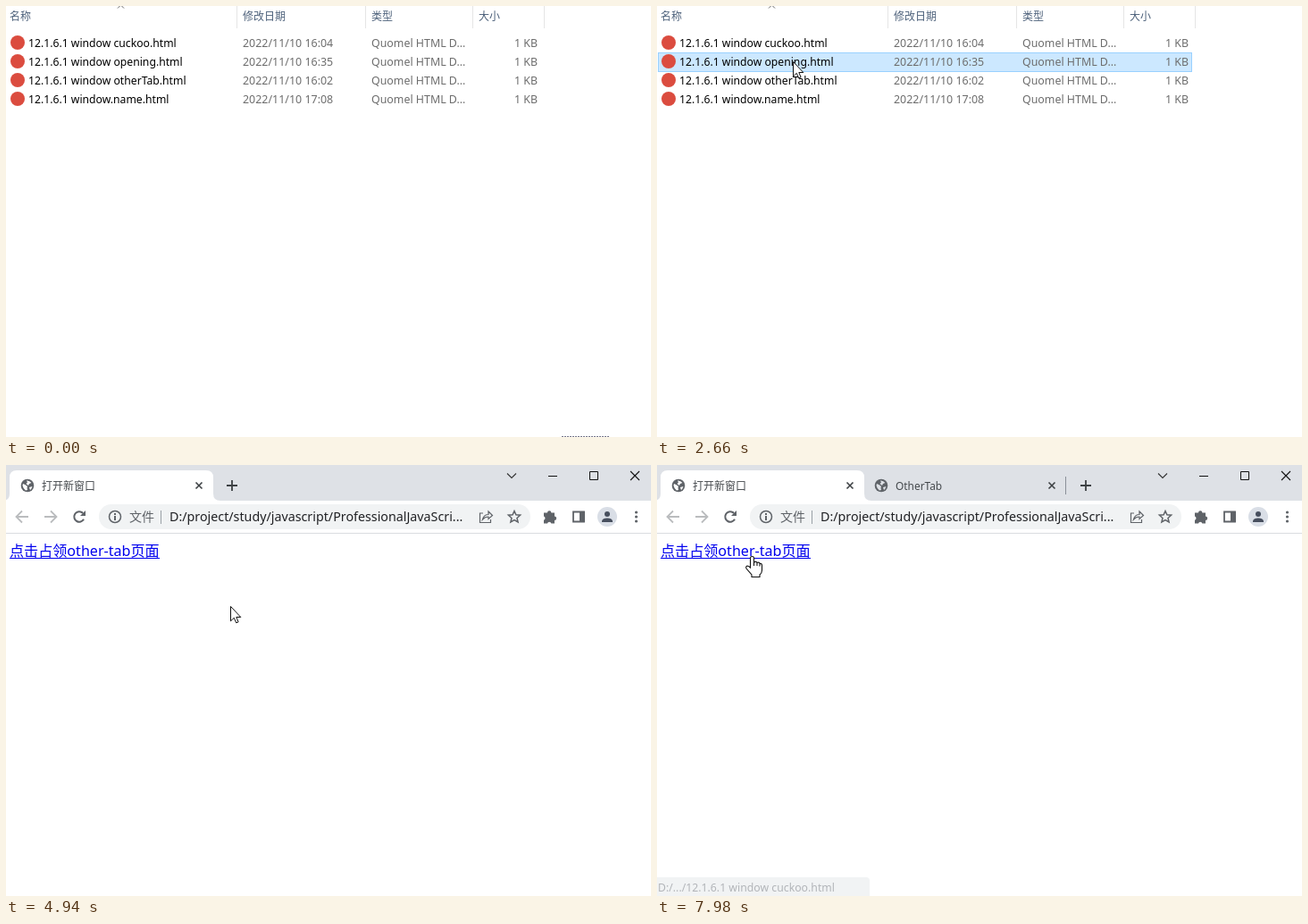
An HTML page with a canvas for the animation above (8000 ms loop, 722 px wide and 483 px high).

```html
<!DOCTYPE html>
<html lang="zh">
<head>
<meta charset="utf-8">
<title>window.name</title>
<style>
html, body { margin: 0; width: 100%; height: 100%; overflow: hidden; background: #fff; }
canvas { display: block; }
</style>
</head>
<body>
<canvas id="stage" width="722" height="483"></canvas>
<script>
const W = 722, H = 483, LOOP = 8000;
const c = document.getElementById('stage').getContext('2d');
const FONT = '"Noto Sans", "Noto Sans CJK SC", "Noto Sans CJK", sans-serif';
const GREY = '#5f6368';

const files = [
  [' cuckoo', '16:04'], [' opening', '16:35'], [' otherTab', '16:02'], ['.name', '17:08']
];

// start, end, steps, from, to
const moves = [
  [150, 950, 18, [631, 468], [169, 74]],
  [1000, 1180, 4, [166, 71], [152, 62]],
  [3870, 4230, 9, [155, 70], [247, 155]],
  [4430, 4510, 3, [248, 156], [251, 158]],
  [4990, 5540, 13, [251, 158], [263, 153]],
  [6150, 6950, 16, [262, 151], [118, 16]],
  [7380, 7980, 10, [118, 19], [106, 102]]
];
const clicks = [[1690, 1770], [1850, 1930], [6980, 7180]];

const within = (t, a, b) => t >= a && t < b;
const ease = p => p + (Math.sin(Math.PI * p / 2) - p) * 0.8;

function pointer(t) {
  let pos = null;
  for (const [start, end, steps, from, to] of moves) {
    if (t < start) break;
    const p = Math.min(1, Math.floor((t - start) / (end - start) * (steps - 1) + 1e-6) / (steps - 1));
    pos = from.map((v, i) => Math.round(v + (to[i] - v) * ease(p)));
  }
  return pos;
}

function rect(x, y, w, h, color) {
  c.fillStyle = color;
  c.fillRect(x, y, w, h);
}

function text(s, x, y, size, color, align = 'left') {
  c.font = size + 'px ' + FONT;
  c.textAlign = align;
  c.fillStyle = color;
  c.fillText(s, x, y);
}

function disc(x, y, r, color) {
  c.beginPath();
  c.arc(x, y, r, 0, Math.PI * 2);
  c.fillStyle = color;
  c.fill();
}

function ring(x, y, r, color, width, a = 0, b = Math.PI * 2) {
  c.beginPath();
  c.arc(x, y, r, a, b);
  c.strokeStyle = color;
  c.lineWidth = width;
  c.stroke();
}

function shape(d, x, y, stroke, width = 1, fill) {
  const path = new Path2D(d);
  c.save();
  c.translate(x, y);
  if (fill) { c.fillStyle = fill; c.fill(path); }
  if (stroke) { c.strokeStyle = stroke; c.lineWidth = width; c.stroke(path); }
  c.restore();
}

function pill(x, y, w, h, r, color) {
  c.beginPath();
  c.roundRect(x, y, w, h, r);
  c.fillStyle = color;
  c.fill();
}

function explorer(t, pos) {
  rect(0, 0, W, H, '#fff');
  const heads = [['名称', 4], ['修改日期', 265], ['类型', 409], ['大小', 529]];
  for (const [s, x] of heads) text(s, x, 16, 12, '#4c607a');
  for (const x of [258, 402, 522, 602]) rect(x, 0, 1, 25, '#e5e5e5');
  shape('M-3.5 2.5L0 -1L3.5 2.5', 128.5, 0, '#666');

  const picked = t >= 1690;
  files.forEach(([name, time], i) => {
    const y = 31 + i * 21;
    const hover = pos && pos[0] < 599 && within(pos[1], y, y + 21);
    if (picked && i === 1) {
      rect(1, y, 598, 22, '#99d1ff');
      rect(2, y + 1, 596, 20, '#cce8ff');
    } else if (hover) {
      rect(1, y, 598, 22, '#e5f3ff');
    }
    disc(13, y + 10, 8, '#db4c3f');
    text('12.1.6.1 window' + name + '.html', 25, y + 15, 12.2, '#000');
    text('2022/11/10 ' + time, 265, y + 15, 12.45, '#6d6d6d');
    text('Quomel HTML D...', 409, y + 15, 12.4, '#6d6d6d');
    text('1 KB', 595, y + 15, 12.4, '#6d6d6d', 'right');
  });
  if (!picked) for (let x = 622; x < 675; x += 3) rect(x, 482, 2, 1, '#77788c');
}

function tabShape(a, b, color) {
  shape(`M${a - 8} 40Q${a} 40 ${a} 32V14Q${a} 6 ${a + 8} 6H${b - 8}Q${b} 6 ${b} 14V32Q${b} 40 ${b + 8} 40Z`, 0, 0, null, 0, color);
}

function tabLabel(x, title, size, end, bg) {
  disc(x + 20, 23, 7.3, GREY);
  shape('M-5 -2Q-2 -1 0 1Q-1 2 0 5L-2 5.5Q-5 3 -5.5 0ZM-1 -5.5Q2 -6 4.5 -3L2 -2L1 0L-1.5 -2L0 -3.5ZM2 2L5.5 1Q4.5 4 3 5Z', x + 20, 23, null, 0, bg);
  c.save();
  c.beginPath();
  c.rect(x, 0, Math.max(0, end - x - 25), 40);
  c.clip();
  text(title, x + 36, 28, size, '#45494d');
  c.restore();
  shape('M-3.5 -3.5L3.5 3.5M3.5 -3.5L-3.5 3.5', end - 16, 23, '#3c4043', 1.6);
}

function toolbar(hover) {
  rect(0, 40, W, 36, '#fff');
  rect(0, 76, W, 1, '#dadce0');
  shape('M7 0H-6M0 -6.5L-6.5 0L0 6.5', 18, 58, '#babcbe', 1.8);
  shape('M-7 0H6M0 -6.5L6.5 0L0 6.5', 50, 58, '#babcbe', 1.8);
  ring(82, 58, 5.7, GREY, 2, 0.5, 5.5);
  shape('M1 -1H7V-7Z', 82, 58, null, 0, GREY);

  pill(104, 44, 483, 28, 14, hover ? '#eaecef' : '#f1f3f4');
  ring(122, 58, 6.5, GREY, 1.5);
  rect(121, 57, 2, 5, GREY);
  rect(121, 54, 2, 2, GREY);
  text('文件', 138, 63, 14, GREY);
  rect(173, 51, 1, 15, '#9aa0a6');
  text('D:/project/study/javascript/ProfessionalJavaScri...', 183, 63, 14.27, '#202124');

  shape('M-3 -4H-6.5V6.5H5.5V3M-3.5 3Q-2 -2.5 3 -2.5V-6L7.5 -1.5L3 2.5V0Q-1 0 -3.5 3Z', 537, 58, GREY, 1.2);
  shape('M0 -6.5L1.9 -2.2L6.6 -1.8L3 1.4L4.1 6L0 3.6L-4.1 6L-3 1.4L-6.6 -1.8L-1.9 -2.2Z', 569, 58, GREY, 1.5);
  shape('M-7 -4H-3A2.2 2.2 0 1 1 1.4 -4H5V0A2.2 2.2 0 1 1 5 4.4V8H1.4A2.3 2.3 0 0 0 -3 8H-7V4.3A2.3 2.3 0 0 0 -7 0Z', 609, 57.5, null, 0, GREY);
  shape('M-6 -5.5H6V5.5H-6Z', 641, 58, GREY, 1.8);
  rect(642, 52, 6, 12, GREY);
  disc(673, 58, 11, '#d9dee6');
  disc(673, 55, 3, '#474f5e');
  shape('M-6 6V4.5Q-5 1.5 0 1.5Q5 1.5 6 4.5V6Z', 673, 58, null, 0, '#474f5e');
  for (const y of [53, 58, 63]) disc(705.5, y, 1.6, GREY);
}

function browser(t, pos) {
  rect(0, 0, W, H, '#fff');
  rect(0, 0, W, 40, '#dee1e6');
  const grow = Math.min(1, Math.max(0, (t - 5030) / 220));
  const end = 231 + 227 * (1 - (1 - grow) ** 2);
  const second = grow > 0 && t < 7100;
  const hover = second && pos[1] < 40 && pos[0] < 231;
  if (hover) tabShape(4, 231, '#e9ebee');
  if (second) tabShape(231, Math.max(end, 248), '#fff');
  else tabShape(4, 232, '#fff');
  tabLabel(4, '打开新窗口', 12, 232, second ? '#dee1e6' : '#fff');
  if (end > 275) tabLabel(231, 'OtherTab', 11.9, end, second ? '#fff' : '#dee1e6');
  if (!second && grow === 1) rect(457, 13, 1, 20, '#8a9099');
  shape('M-6 0H6M0 -6V6', end + 22, 23, '#3c4043', 1.8);

  shape('M-5 -2.5L0 2.5L5 -2.5', 566, 12, '#333', 1.1);
  rect(607, 12, 10, 1, '#111');
  shape('M-4.5 -4.5H4.5V4.5H-4.5Z', 658, 12, '#111');
  shape('M-5 -5L5 5M5 -5L-5 5', 704, 12, '#111', 1.1);
  toolbar(within(pos[0], 104, 587) && within(pos[1], 44, 72));

  if (second) {
    if (t >= 5300) text('临时性的othertab，window.name被设置为"other-tab"', 4, 110, 16.1, '#000');
  } else {
    text('点击占领other-tab页面', 4, 102, 16.1, '#0000ee');
    rect(4, 104, 168, 1, '#0000ee');
  }
  if (t >= 7910) {
    c.globalAlpha = t < 7980 ? 0.5 : 1;
    pill(-6, 462, 244, 30, 4, '#f1f3f4');
    text('D:/.../12.1.6.1 window cuckoo.html', 1, 478, 12.27, '#b2b5b9');
    c.globalAlpha = 1;
  }
}

function opening(t) {
  const p = Math.min(1, (Math.floor((t - 3180) / 48) + 1) / 6);
  const s = 0.9 + 0.1 * p;
  c.globalAlpha = p;
  rect(361 * (1 - s), 300 * (1 - s), W * s, 600 * s, '#fff');
  c.globalAlpha = 1;
}

function drawPointer(t, [x, y]) {
  const lit = clicks.some(([a, b]) => within(t, a, b));
  if (lit) disc(x, y, 12, 'rgba(255,255,0,.5)');
  if (t >= 7380 && y >= 88) {
    shape('M-1.5 13V2Q-1.5 0.5 .5 .5Q2.5 .5 2.5 2V7Q5 5.5 6 7.5Q8.5 6.5 9 8.5Q11.5 8 11.5 10.5V16Q11.5 19 9 21V23.5H0V21L-6 14Q-7 12 -5 11Q-3.5 11 -1.5 13ZM2.5 7V11M6 7.5V11M9 8.5V11.5', x, y, '#111', 1.1, '#fff');
    return;
  }
  if (within(t, 2230, 2660)) {
    const a = t < 2380 ? -1.2 : 1.6;
    ring(x + 14.5, y + 1.5, 6.8, '#a9d6f5', 3);
    ring(x + 14.5, y + 1.5, 6.8, '#2585cf', 3, a, a + 3.6);
  }
  shape('M0 0V16.4L3.8 12.8L6.2 18.4L8.6 17.4L6.3 12H11.3Z', x + 0.5, y + 0.5, lit ? '#20207c' : '#111', 1, '#fff');
}

function draw(t) {
  const pos = pointer(t);
  if (t >= 4940) browser(t, pos);
  else {
    if (t < 3420) explorer(t, pos);
    else rect(0, 0, W, H, '#fff');
    if (within(t, 3180, 3420)) opening(t);
  }
  if (pos) drawPointer(t, pos);
}

const begin = performance.now();
function tick() {
  draw((performance.now() - begin) % LOOP);
  requestAnimationFrame(tick);
}
tick();
</script>
</body>
</html>
```
